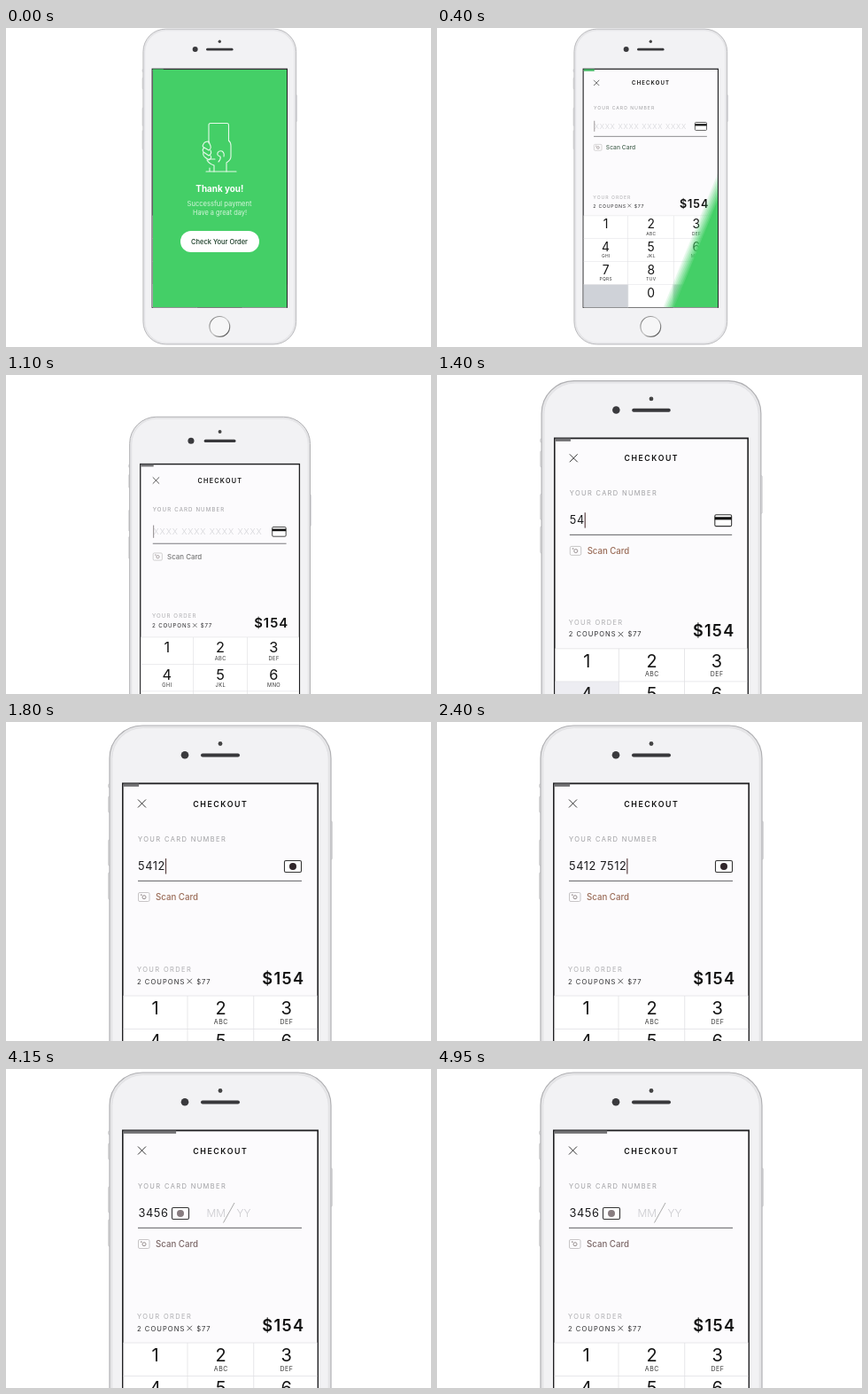
These frames come from a looping animation (480x360 px, 5000 ms). An HTML page with a canvas:

```html
<!DOCTYPE html>
<html lang="en">
<head>
<meta charset="utf-8">
<title>Checkout</title>
<style>
  html, body { margin: 0; width: 100%; height: 100%; overflow: hidden; background: #fff; }
  canvas { display: block; }
</style>
</head>
<body>
<canvas id="stage" width="480" height="360"></canvas>
<script>
const ctx = document.getElementById('stage').getContext('2d');
const LOOP = 5000, REST = 1 / 1.447;
const CARD = '5412751234123456';
const KEYS = ['1', '2 ABC', '3 DEF', '4 GHI', '5 JKL', '6 MNO', '7 PQRS', '8 TUV', '9 WXYZ', '', '0', ''];

const clamp = v => Math.min(1, Math.max(0, v));
const span = (t, from, to) => clamp((t - from) / (to - from));
const smooth = p => p * p * (3 - 2 * p);
const easeOut = p => 1 - (1 - p) ** 3;
const mix = (a, b, p) => a + (b - a) * p;
const pressTime = i => i < 8 ? 1200 + 160 * i : 2440 + 100 * (i - 8);

function text(str, x, y, size, color, { weight = 400, space = 0, align = 'left' } = {}) {
  ctx.font = `${weight} ${size}px Inter, sans-serif`;
  ctx.letterSpacing = space + 'px';
  const width = ctx.measureText(str).width - space;
  ctx.fillStyle = color;
  ctx.fillText(str, x - (align === 'center' ? width / 2 : align === 'right' ? width : 0), y);
  return width;
}
function rect(x, y, w, h, color) {
  ctx.fillStyle = color;
  ctx.fillRect(x, y, w, h);
}
function round(x, y, w, h, r, fill, stroke, line = 1) {
  ctx.beginPath();
  ctx.roundRect(x, y, w, h, r);
  paint(fill, stroke, line);
}
function circle(x, y, r, fill, stroke, line) {
  ctx.beginPath();
  ctx.arc(x, y, r, 0, 7);
  paint(fill, stroke, line);
}
function path(d, stroke, line) {
  ctx.lineWidth = line;
  ctx.strokeStyle = stroke;
  ctx.stroke(new Path2D(d));
}
function paint(fill, stroke, line = 1) {
  if (fill) { ctx.fillStyle = fill; ctx.fill(); }
  if (stroke) { ctx.strokeStyle = stroke; ctx.lineWidth = line; ctx.stroke(); }
}

function drawPhone() {
  for (const [x, y, h] of [[115.5, 70, 4], [115.5, 84, 18], [115.5, 133, 29], [115.5, 170, 30], [365.5, 112, 43]])
    round(x, y, 3, h, 1, '#ececee', '#b8b8bb', 0.5);
  round(117, 4, 250, 515, 37, '#e6e6e8', '#b0b0b3', 1.2);
  round(119.8, 6.5, 244.4, 510, 35, '#f2f2f4', '#e0e0e3', 0.8);
  circle(242, 24.5, 2.4, '#444');
  circle(202, 37.2, 4.3, '#3a3a3d');
  round(220, 35.4, 44, 4, 2, '#38383b');
  const ring = ctx.createLinearGradient(228, 476, 256, 504);
  ring.addColorStop(0, '#777');
  ring.addColorStop(0.5, '#ccc');
  ring.addColorStop(1, '#444');
  circle(242, 490, 16.5, '#f6f6f7', ring, 1.6);
  rect(131, 68.5, 222, 391, '#1f1f21');
  rect(132.6, 70.3, 218.8, 388.2, '#fcfbfd');
}

function drawKeypad(pressed) {
  rect(132.6, 309, 218.8, 149.5, '#fff');
  KEYS.forEach((key, i) => {
    const col = i % 3, x = 132.6 + col * 73, y = 309 + Math.floor(i / 3) * 37.4;
    const [digit, letters] = key.split(' ');
    if (!key) rect(x, y, 73, 37.4, '#cfd2d8');
    else if (digit === pressed) rect(x, y, 73, 37.4, '#ededf2');
    const center = 168.6 + col * 74;
    text(digit, center, y + 21, 20, '#151515', { align: 'center' });
    if (letters) text(letters, center, y + 31.5, 7, '#333', { space: 0.5, align: 'center' });
  });
  for (let i = 0; i < 4; i++) rect(132.6, 308.6 + i * 37.4, 218.8, 0.8, '#e2e2e5');
  for (const x of [204.6, 279.4]) rect(x, 309, 0.8, 149.5, '#e0e0e3');
}

function drawCardIcon(x, t) {
  round(x + 0.5, 156.5, 19, 13, 1.5, '#fff', '#333', 1.1);
  if (t < pressTime(3)) rect(x + 0.5, 159, 19, 3.2, '#111');
  else circle(x + 10, 163, 4, t < 4000 ? '#30262a' : '#887d80');
}

function drawCheckout(t) {
  const typed = [...CARD].filter((_, i) => t >= pressTime(i)).length;
  const pressed = typed && t - pressTime(typed - 1) < 75 ? CARD[typed - 1] : null;
  const textSlide = easeOut(span(t, 3270, 3840));
  const iconSlide = easeOut(span(t, 3300, 3880));
  const tint = t < 600 ? '#486553' : t < 1200 ? '#777' : t < 4000 ? '#9a6c58' : '#7b6767';

  rect(132.6, 69.5, 218.8 * mix(0.08, 0.272, smooth(span(t, 3600, 4050))), 3.4, t < 600 ? '#41b862' : '#727274');
  path('M149 87.5l9 9m0-9l-9 9', '#333', 1);
  text('CHECKOUT', 241.6, 95.5, 8.8, '#111', { weight: 600, space: 1.55, align: 'center' });
  text('YOUR CARD NUMBER', 149, 135, 7.5, '#9f9fa2', { space: 1.37 });

  ctx.save();
  ctx.beginPath();
  ctx.rect(148, 145, 188, 33);
  ctx.clip();
  let caret = 149.5;
  if (typed) {
    const shown = CARD.slice(0, typed).replace(/(.{4})(?=.)/g, '$1 ');
    const style = { space: 0.6 };
    if (textSlide) text(shown, mix(291, 183, textSlide), 167.3, 12.8, '#1b1b1d', { ...style, align: 'right' });
    else caret += text(shown, 149, 167.3, 12.8, '#1b1b1d', style);
  } else {
    text('XXXX XXXX XXXX XXXX', 150, 167.3, 11.5, '#d4d4d8', { weight: 300, space: 1.02 });
  }
  if (!textSlide) rect(caret, 154, 1.2, 17.5, typed ? '#5c4344' : '#8c8688');
  drawCardIcon(mix(314, 187, iconSlide), t);
  ctx.globalAlpha = span(t, 3700, 4000);
  text('MM', 226.5, 167.3, 12, '#cacace', { weight: 300 });
  text('YY', 260.5, 167.3, 12, '#cacace', { weight: 300 });
  path('M245.5 173.5L258 151', '#aaa', 1);
  ctx.restore();

  rect(149, 178.8, 185, 1.1, '#6c6c6f');
  round(149.5, 192.5, 12.5, 10, 1.5, null, '#c2c0c1', 0.9);
  circle(156, 197.7, 2, null, '#8d8484', 0.9);
  rect(152, 194.5, 1.6, 1.2, '#8d8484');
  text('Scan Card', 169, 201, 9.7, tint, { weight: 500 });
  text('YOUR ORDER', 148, 282, 7.5, '#adadb0', { space: 1.37 });
  text('2 COUPONS', 148, 295.5, 7.6, '#2c2c2e', { space: 1.03 });
  path('M204.5 289.800l5.500 5.500m0-5.500l-5.500 5.500', '#2c2c2e', 0.8);
  text('$77', 230.5, 295.5, 7.6, '#2c2c2e', { space: 0.8, align: 'right' });
  text('$154', 336, 295.5, 18.2, '#111', { weight: 600, space: 1.3, align: 'right' });
  drawKeypad(pressed);
}

function drawThanks() {
  rect(166, 47, 151, 268, '#44cf67');
  const line = '#e6faea', mid = { align: 'center' };
  ctx.lineCap = ctx.lineJoin = 'round';
  path('M229 130V109.500q0-2 2-2H249.500q2 0 2 2V127', line, 1.1);
  path('M251.500 127q2.500 2 2.500 6V145q0 4-5 7V162M235 162V155q-6-2-8-6M229 148H236', line, 1.1);
  path('M229 128q-5 0-6 3q-2 3 1 4l5 3q3-2 2-5zM224 135q-3 2-1 5l6 4q4-2 2-6M223 140q-1 4 2 6l4 3q4-2 2-5', line, 1.1);
  path('M240 151q3-3 2-6q-4-1-3-4t5-2q3 2 2 6M226 162H260M230 158V162', line, 1.1);
  text('Thank you!', 241.3, 185, 9.9, '#fff', { ...mid, weight: 700 });
  text('Successful payment', 241, 201, 7.6, '#d5f5dc', mid);
  text('Have a great day!', 241.5, 211, 7.4, '#d5f5dc', mid);
  round(197, 229, 89, 24, 12, '#fff');
  text('Check Your Order', 241, 243.7, 7.5, '#173a24', { ...mid, weight: 500 });
}

// Diagonal wipe; stacked layers give the moving edge its blur.
function drawWipe(t) {
  const edge = mix(140, 430, smooth(span(t, 150, 502)));
  const layers = 8, lean = 0.407 * 270;
  for (let i = 0; i < layers; i++) {
    const x = edge + (i / layers - 0.5) * 14;
    ctx.save();
    ctx.beginPath();
    ctx.moveTo(x, 46);
    ctx.lineTo(600, 46);
    ctx.lineTo(600, 316);
    ctx.lineTo(x - lean, 316);
    ctx.clip();
    ctx.globalAlpha = 1 / (layers - i);
    drawThanks();
    ctx.restore();
  }
}

function draw(t) {
  rect(0, 0, 480, 360, '#fff');
  const zoom = smooth(span(t, 820, 1467));
  const dip = 45 * Math.sin(Math.PI * span(t, 745, 1457)) ** 2;
  const scale = mix(REST, 1, zoom);
  ctx.save();
  ctx.translate(mix(241.3, 242, zoom), mix(46, 69, zoom) + dip);
  ctx.scale(scale, scale);
  ctx.translate(-242, -69);
  drawPhone();
  drawCheckout(t);
  ctx.restore();
  if (t < 502) drawWipe(t);
}

const start = performance.now();
function frame() {
  draw((performance.now() - start) % LOOP);
  requestAnimationFrame(frame);
}
frame();
</script>
</body>
</html>
```
